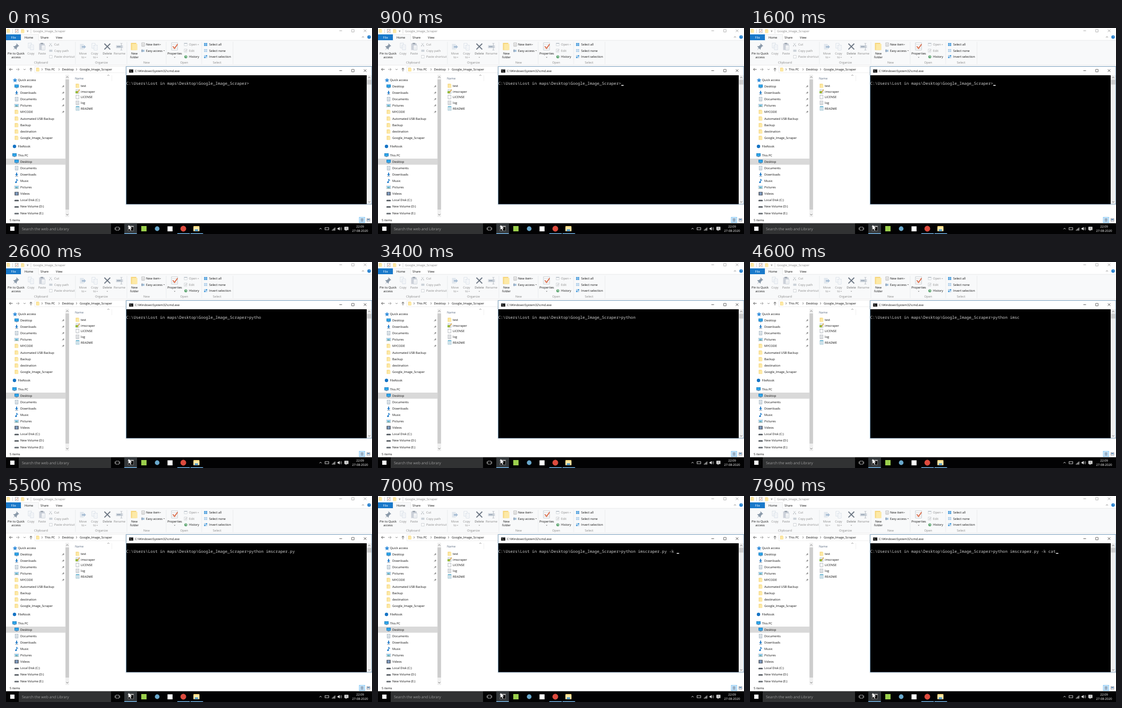
An HTML page that plays this animation: 690 px wide and 388 px high, repeating every 8 s.

```html
<!DOCTYPE html>
<html lang="en">
<head>
<meta charset="utf-8">
<title>Terminal typing</title>
<style>
html, body { margin: 0; width: 100%; height: 100%; overflow: hidden; background: #fff; }
svg { display: block; width: 690px; height: 388px; }
text { font-family: "Open Sans", "Noto Sans", sans-serif; font-size: 5.75px; white-space: pre; text-rendering: geometricPrecision; }
.mono { font-family: "Noto Sans Mono", "Liberation Mono", monospace; font-size: 7.575px; }
</style>
</head>
<body>
<svg id="stage" viewBox="0 0 690 388"></svg>
<script>
const out = [];
const INK = '#111', DIM = '#8c8c8c', BLUE = '#1979ca', SKY = '#2f8fd8';

const rect = (x, y, w, h, fill, extra = '') =>
  out.push(`<rect x="${x}" y="${y}" width="${w}" height="${h}" fill="${fill}" ${extra}/>`);
const disc = (x, y, r, fill) => out.push(`<circle cx="${x}" cy="${y}" r="${r}" fill="${fill}"/>`);
const line = (d, color = '#555', w = 0.8) =>
  out.push(`<path d="${d}" fill="none" stroke="${color}" stroke-width="${w}"/>`);
const shape = (d, fill) => out.push(`<path d="${d}" fill="${fill}"/>`);
const label = (x, y, s, fill = INK, extra = '') =>
  out.push(`<text x="${x}" y="${y}" fill="${fill}" ${extra}>${s}</text>`);
const centered = (x, y, s, fill) => label(x, y, s, fill, 'text-anchor="middle"');
const caret = (x, y, color = '#666') => shape(`M${x - 1.3} ${y - 0.7}h2.6l-1.3 1.5z`, color);
const chevron = (x, y, dx, dy, color = '#555') =>
  line(dx ? `M${x - dx} ${y - 2}l${2 * dx} 2l${-2 * dx} 2` : `M${x - 2} ${y - dy}l2 ${2 * dy}l2 ${-2 * dy}`, color);

function folder(x, y, s = 1) {
  rect(x, y, 6 * s, 8 * s, '#f6d67c');
  rect(x + 1.2 * s, y + 1.2 * s, 6 * s, 6.8 * s, '#fde9a6');
}
function sheet(x, y, w, h, edge = '#8a929b', rows = 0) {
  rect(x, y, w, h, '#fff', `stroke="${edge}" stroke-width=".6"`);
  for (let i = 1; i <= rows; i++) rect(x + 1, y + i * h / (rows + 1), w - 2, 0.5, edge);
}
function screen(x, y) {
  rect(x, y, 8, 5.6, '#176fb5');
  rect(x + 0.6, y + 0.6, 6.8, 4.4, '#2fa5e8');
  rect(x + 2, y + 6, 4, 0.8, '#52778f');
}
function arrow(x, y, dir, color) {
  shape(dir === 'down'
    ? `M${x - 1} ${y - 3}h2v3h2l-3 3.4l-3 -3.4h2z`
    : `M${x - 4} ${y - 1.4}h4v-2l3.8 3.4l-3.8 3.4v-2h-4z`, color);
}
function windowButtons(y, min, max, close, color) {
  line(`M${min - 2.5} ${y}h5`, color);
  line(`M${max - 2.3} ${y - 2.3}h4.6v4.6h-4.6z`, color, 0.7);
  line(`M${close - 2.4} ${y - 2.4}l4.8 4.8m0 -4.8l-4.8 4.8`, color);
}

function titleAndTabs() {
  rect(0, 0, 690, 388, '#fff');
  folder(1.5, 2, 0.85);
  line('M12.5 2v8', '#bbb', 0.6);
  sheet(17.5, 2.5, 5.5, 6.5, '#888');
  line('M18.7 5.5l1.2 1.6l2.2 -3.4', '#d35c3a', 0.7);
  folder(28.5, 2.5, 0.85);
  line('M39.2 5h3.2', '#555', 0.6);
  caret(40.8, 7);
  line('M47 2v8', '#bbb', 0.6);
  label(51, 8, 'Google_Image_Scraper', '#8a8a8a');
  windowButtons(5.2, 631, 654, 677, '#999');

  rect(0, 12, 28, 11.5, BLUE);
  label(9.5, 19.7, 'File', '#fff');
  rect(0, 23, 690, 47, '#f8f9fa');
  line('M28 23.2H690M0 70H690', '#e2e3e4', 0.7);
  rect(28.4, 12, 33, 11.6, '#f8f9fa', 'stroke="#e0e1e2" stroke-width=".6"');
  rect(28.8, 22.8, 32.2, 1.2, '#f8f9fa');
  label(35, 19.7, 'Home');
  label(65, 19.7, 'Share');
  label(94, 19.7, 'View');
  chevron(673, 17, 0, -0.8, '#777');
  disc(684.5, 17, 3.2, BLUE);
  centered(684.5, 19.1, '?', '#fff');
}

function ribbon() {
  for (const x of [131, 228, 302, 369, 428]) line(`M${x} 26v42`, '#e6e7e8', 0.7);
  [['Clipboard', 66], ['Organize', 180], ['New', 265], ['Open', 336], ['Select', 398]]
    .forEach(([s, x]) => centered(x, 67, s, '#858585'));

  const big = [[19, 'Pin to Quick', 'access', INK], [47, 'Copy', '', DIM], [68, 'Paste', '', DIM],
    [145, 'Move', 'to', DIM], [167, 'Copy', 'to', DIM], [191, 'Delete', '', '#666'],
    [214, 'Rename', '', DIM], [242, 'New', 'folder', INK], [318, 'Properties', '', INK]];
  for (const [x, a, b, color] of big) {
    centered(x, 50.3, a, color);
    if (b) centered(x, 57.3, b, color);
  }
  caret(150, 55.5, '#999'); caret(172, 55.5, '#999');
  caret(191, 55.5, '#888'); caret(318, 55.5);

  // Pin, copy, paste
  shape('M19.5 28.5l5.5 5.5l-2 .6l-2.6 3l-.6 3.4l-2.8 -2.8l-3.4 3.4l2.6 -4.2l-2.8 -2.8l3.4 -.6l3 -2.6z', '#8b9aaa');
  sheet(42, 28.5, 6, 9, '#c3cedb', 3);
  sheet(46, 32, 6, 9, '#c3cedb', 3);
  rect(62.5, 29, 10.5, 12.5, '#cdd2da');
  rect(65.2, 28, 5, 2.4, '#9aa3ae');
  sheet(67, 32.5, 6.5, 9, '#b3bdc9', 3);

  // Small clipboard commands
  line('M82 28.5l4 4.6m0 -4.6l-4 4.6', '#b4b9be', 0.7);
  disc(82, 33.6, 0.9, '#b4b9be'); disc(86, 33.6, 0.9, '#b4b9be');
  rect(81.5, 40.8, 6, 4, '#cbd1d8');
  sheet(82, 51.3, 5, 5.5, '#b8bdc3');
  ['Cut', 'Copy path', 'Paste shortcut'].forEach((s, i) => label(91, 33.3 + i * 11.4, s, DIM));

  // Organize and new
  rect(139.5, 30, 7, 10.5, '#e1e7ee'); arrow(147, 35.5, 'right', '#a9bfd5');
  sheet(162, 29, 6, 9, '#c3cedb', 2); sheet(166, 32.5, 6, 9, '#c3cedb', 2);
  line('M185.5 29.5l11 10.8m0 -10.8l-11 10.8', '#6c7683', 1.8);
  rect(207.5, 32.5, 13, 5.5, '#d3d9e0'); rect(209, 34, 7, 2.2, '#a2aebc');
  line('M215.5 29h4m-2 0v12.5m-2 0h4', '#aab1b9', 0.7);
  folder(235.5, 28, 1.7);
  sheet(256, 28, 5, 6.2, '#888', 2);
  rect(255, 41, 6, 4, '#a9c5dc'); line('M256.5 40v5.6', '#778', 0.7);
  label(264, 33.3, 'New item'); label(264, 44.7, 'Easy access');
  caret(291, 31.4); caret(298, 42.8);

  // Open and select
  sheet(312, 28, 11.5, 13.5, '#a6acb3', 3);
  line('M314.5 34.5l3.2 4l5.8 -8', '#dd6844', 1.7);
  sheet(336, 28.5, 5.5, 5, '#b9c1c9'); rect(336, 28.5, 5.5, 1.3, '#b9c1c9');
  sheet(336, 39.8, 5, 5.4, '#b8bdc3', 2); line('M338 44l3.5 -3.5', '#b0b0b0', 0.7);
  disc(339, 54.2, 2.8, '#5aa46e'); line('M339 52.2v2.2h1.8', '#fff', 0.7);
  label(345, 33.3, 'Open', DIM); label(345, 44.7, 'Edit', DIM); label(345, 56.1, 'History');
  caret(362.5, 31.4, '#999');
  ['Select all', 'Select none', 'Invert selection'].forEach((s, i) => {
    const y = 28.4 + i * 11.4;
    for (let k = 0; k < 4; k++)
      rect(373.5 + k % 2 * 3.2, y + (k >> 1) * 3, 2.6, 2.4,
        i === 0 || i === 2 && k % 3 ? SKY : '#a8cbe8');
    label(383, 33.3 + i * 11.4, s);
  });
}

function addressBar() {
  line('M12.5 78h-6m2.4 -2.4l-2.4 2.4l2.4 2.4', '#333');
  line('M19 78h6m-2.4 -2.4l2.4 2.4l-2.4 2.4', '#888');
  chevron(35, 78, 0, 0.8, '#777');
  line('M47 81.5v-6m-2.5 2.4l2.5 -2.4l2.5 2.4', '#333');
  line('M227 72.5H54.5v11.7H227', '#e2e2e2', 0.6);
  folder(57, 74.8, 0.85);
  for (const x of [68, 100, 133]) chevron(x, 78, 0.6, 0, '#666');
  label(73, 80.2, 'This PC');
  label(105.5, 80.2, 'Desktop');
  label(139, 80.2, 'Google_Image_Scraper');
}

const places = [
  ['Quick access', 98, 'star'], ['Desktop', 110, 'screen'], ['Downloads', 122, 'down'],
  ['Documents', 134, 'doc'], ['Pictures', 146, 'pic'], ['MYCODE', 158, 'dir'],
  ['Automated USB Backup', 170.5, 'dir'], ['Backup', 183, 'dir'], ['destination', 195, 'dir'],
  ['Google_Image_Scraper', 207, 'dir'], ['FileNook', 223, 'cloud'], ['This PC', 239.5, 'pc'],
  ['Desktop', 251.5, 'screen'], ['Documents', 264, 'doc'], ['Downloads', 276, 'down'],
  ['Music', 288, 'note'], ['Pictures', 300, 'pic'], ['Videos', 312, 'film'],
  ['Local Disk (C:)', 324, 'disk'], ['New Volume (D:)', 336, 'disk'], ['New Volume (E:)', 348.5, 'disk']];

const icons = {
  star: (x, y) => shape(`M${x + 5} ${y - 4}l1.3 2.7l3 .4l-2.2 2.1l.6 3l-2.7 -1.5l-2.7 1.5l.6 -3l-2.2 -2.1l3 -.4z`, '#3a91dc'),
  screen: (x, y) => screen(x, y - 3.5),
  pc: (x, y) => screen(x, y - 3.5),
  down: (x, y) => { arrow(x + 4, y - 0.5, 'down', '#2a7fc9'); rect(x + 1, y + 3, 6, 0.8, '#8796a5'); },
  doc: (x, y) => sheet(x + 1.2, y - 3.5, 5.6, 7, '#7790a5', 3),
  pic: (x, y) => {
    sheet(x, y - 2.8, 8, 5.6, '#9fb0bc');
    rect(x + 0.8, y - 2, 6.4, 2.6, '#83c8ef');
    shape(`M${x + 0.8} ${y + 2}l2.4 -2.6l1.8 1.7l1 -.9l1.2 1.8z`, '#5f9e98');
  },
  dir: (x, y) => folder(x + 0.5, y - 3.8, 0.95),
  cloud: (x, y) => disc(x + 4, y, 3.2, '#1674c5'),
  note: (x, y) => { line(`M${x + 4} ${y + 2.5}v-6q.5 2 2.6 2.6`, BLUE, 1.1); disc(x + 2.8, y + 2.4, 1.6, BLUE); },
  film: (x, y) => { rect(x + 0.3, y - 3.3, 7.4, 6.6, '#454b55'); rect(x + 1.7, y - 2.5, 4.6, 5, '#7f9cc0'); },
  disk: (x, y) => { rect(x, y, 8, 2.3, '#50565c'); rect(x + 0.7, y - 1.2, 6.6, 1.2, '#c8cdd2'); }
};

function sidebar() {
  rect(0, 246, 112, 11.5, '#d9d9d9');
  places.forEach(([name, y, icon]) => {
    const top = ['star', 'cloud', 'pc'].includes(icon);
    icons[icon](top ? 12 : 16, y);
    label(top ? 22.5 : 27, y + 2.1, name);
  });
  for (let i = 0; i < 5; i++) {
    const y = 110 + i * 12;
    line(`M105.4 ${y + 2.4}l1.8 -1.8`, '#8a8a8a', 0.6);
    shape(`M106 ${y - 0.4}l1.4 -.2l1 -1.6l1.6 1.6l-1.6 1l-.2 1.6z`, '#808080');
  }
  rect(112, 88, 7, 268, '#f0f0f0');
  rect(112.2, 97, 6.6, 245, '#cdcdcd');
  chevron(115.5, 92.5, 0, -0.9);
  chevron(115.5, 351.5, 0, 0.9);
}

function files() {
  label(130, 96.7, 'Name', '#5b6b82');
  chevron(193, 89, 0, -0.7, '#888');
  line('M199.5 89v11', '#e8e8e8', 0.6);
  folder(131.5, 105, 0.95);
  sheet(132, 116, 6, 7, '#8b9aa5', 2);
  rect(131, 119, 5, 4, '#8bbe3d'); line('M134 122l5 -6', '#e0a63a', 1.2);
  sheet(132, 126.5, 5.5, 7);
  sheet(132, 137.5, 5.5, 7, '#8a929b', 3);
  sheet(132, 148, 6, 7, '#5e9bb4', 3); rect(132, 147.5, 6, 1.5, '#58afd0');
  ['test', 'imscraper', 'LICENSE', 'log', 'README'].forEach((s, i) => label(141, 111.2 + i * 10.6, s));

  label(7, 364, '5 items');
  rect(666, 356.5, 10.5, 10, '#cce8ff', 'stroke="#66b7ea" stroke-width=".7"');
  for (let i = 0; i < 3; i++) rect(668.5, 359 + i * 2.2, 5.5, 0.9, '#567');
  sheet(680.5, 359, 5.5, 5, '#556');
  rect(681.3, 359.8, 3.9, 2.2, '#5b8db8');
}

function terminal() {
  rect(225, 71.5, 466, 262, '#000', 'opacity=".05"');
  rect(226.3, 72.3, 463.7, 259.9, '#4a7fa8');
  rect(227, 73, 462.4, 16, '#fff');
  rect(227, 89, 453, 242.6, '#000');
  rect(232, 77, 8, 7, '#111'); rect(232, 77, 8, 1.5, '#b8bdc2');
  line('M233.4 80l1.4 1l-1.4 1m2.2 0h2', '#eee', 0.6);
  label(243, 82.6, 'C:\\Windows\\System32\\cmd.exe');
  windowButtons(80.3, 631, 654, 677, '#333');
  rect(680, 89, 9.4, 242.6, '#f0f0f0');
  rect(680.6, 97.5, 8.2, 9, '#cdcdcd');
  chevron(684.8, 93.3, 0, -0.9);
  chevron(684.8, 327.5, 0, 0.9);
  out.push('<text id="prompt" class="mono" x="226.8" y="107" fill="#cfcfcf"></text>');
  out.push('<rect id="cursor" y="107.3" width="4.5" height="1.6" fill="#e4e4e4"/>');
}

function taskbar() {
  rect(0, 367.7, 690, 20.3, '#020203');
  rect(8, 374, 8, 8, '#fff');
  rect(24, 368, 174, 20, '#313233');
  label(30, 380.8, 'Search the web and Library', '#9b9b9b', 'style="font-size:7px"');
  line('M207 375h6v6h-6zM205.5 376v4m9 -4v4', '#ddd', 0.7);

  rect(223, 367.7, 24, 20.3, '#34383b');
  rect(230, 373, 10.5, 9, '#050505', 'stroke="#aaa" stroke-width=".6"');
  rect(230, 373, 10.5, 1.8, '#bbb');
  rect(255, 373, 10, 10, '#9bcf4c');
  disc(285, 378, 4.4, '#69a8cc');
  rect(304.5, 373.5, 9.5, 9.5, '#fff');
  disc(334.3, 378, 5.4, '#dd4b3e');
  rect(353.5, 373, 11, 9.5, '#f6d67c');
  rect(353.5, 375, 11, 7.5, '#fde9a6');
  rect(356, 379.3, 6, 3.2, '#4a9bd6');
  for (const x of [223, 323, 348]) rect(x, 386.6, 23.5, 1.4, '#76b9ed');
  shape('M231 371v9l2.1 -2l1.5 3.4l1.5 -.7l-1.5 -3.2h2.9z', '#fff');

  chevron(593, 378, 0, -1.1, '#eee');
  rect(601.5, 376, 7, 4, 'none', 'stroke="#eee" stroke-width=".8"');
  for (let i = 0; i < 4; i++) rect(614.5 + i * 1.7, 380 - i * 1.4, 1.1, 1.5 + i * 1.4, '#ccc');
  shape('M625 376.8h1.6l2.4 -2v6.4l-2.4 -2h-1.6z', '#eee');
  line('M630.3 376q1.4 2 0 4m1.4 -5.2q2.2 3.2 0 6.4', '#eee', 0.6);
  shape('M638 374.5h7.5v6h-3l-2 2v-2h-2.5z', '#eee');
  line('M639.5 376.5h4.5m-4.5 2h4.5', '#444', 0.6);
  centered(667.5, 375.6, '22:09', '#fff');
  centered(667.5, 384.2, '27-08-2020', '#fff');
}

[titleAndTabs, ribbon, addressBar, sidebar, files, terminal, taskbar].forEach(draw => draw());
document.getElementById('stage').innerHTML = out.join('');

const LOOP = 8000, CELL = 4.545, BLINK = 1040;
const PATH = 'C:\\Users\\Lost in maps\\Desktop\\Google_Image_Scraper>';
// Each burst: text, time of its first key, time between keys
const bursts = [['python ', 1700, 210], ['imscraper.py', 4200, 105], [' -k ', 5950, 260], ['cat', 7150, 260]];
const prompt = document.getElementById('prompt');
const cursor = document.getElementById('cursor');

function frame(now) {
  const t = now % LOOP;
  const typed = bursts.map(([s, start, gap]) =>
    s.slice(0, Math.max(0, Math.floor((t - start) / gap) + 1))).join('');
  prompt.textContent = PATH + typed;
  cursor.setAttribute('x', 226.8 + (PATH + typed).length * CELL);
  cursor.setAttribute('visibility', t % BLINK >= 530 ? 'visible' : 'hidden');
  requestAnimationFrame(frame);
}
frame(performance.now());
</script>
</body>
</html>
```
